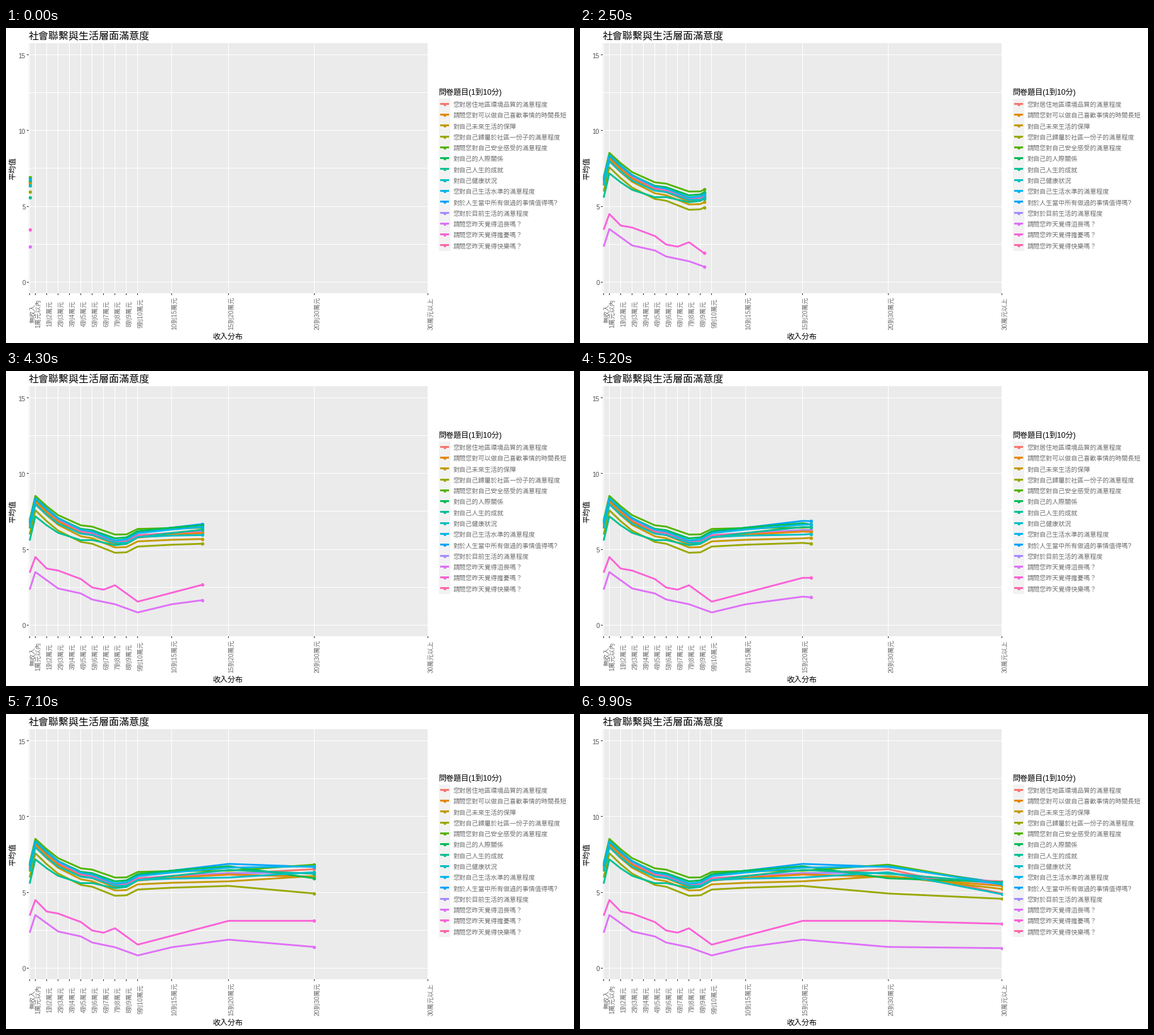
Write a matplotlib script that moves like this. It is 900 px wide and 500 px high and loops after 10000 ms.

```python
import numpy as np
import matplotlib.pyplot as plt
from matplotlib.animation import FuncAnimation
from matplotlib.patches import Rectangle

W, H, DPI = 900, 500, 100
PX = 72 / DPI
FRAMES = 100
LEFT, RIGHT, TOP, BOTTOM = 36, 669, 24, 421
GREY, PALE = "#4D4D4D", "#6E6E6E"
plt.rcParams["font.family"] = ["Liberation Sans", "Noto Sans CJK JP"]

# income midpoints (10k) and their axis labels
income = np.array([0, *np.arange(0.5, 10), 12.5, 17.5, 25, 35])
bands = (["無收入", "1萬元以內"] + [f"{i}到{i + 1}萬元" for i in range(1, 10)]
         + ["10到15萬元", "15到20萬元", "20到30萬元", "30萬元以上"])
# each point is reached on a whole frame, with even motion in between
reach = np.floor(income / 35 * (FRAMES - 1) + 0.5)


def to_x(v):
    return 37.3 + np.asarray(v) * 631 / 35


def to_y(v):
    return 403.7 - np.asarray(v) * 24.1


def hue(i, n):
    """Evenly spaced hue i of n at luminance 65 and chroma 100 (CIE LUV)."""
    h = np.radians(15 + 360 * i / n)
    lum = 65
    u = 100 * np.cos(h) / (13 * lum) + 0.1978
    v = 100 * np.sin(h) / (13 * lum) + 0.4683
    y = ((lum + 16) / 116) ** 3
    xyz = [9 * y * u / (4 * v), y, y * (12 - 3 * u - 20 * v) / (4 * v)]
    rgb = np.array([[3.2406, -1.5372, -0.4986],
                    [-0.9689, 1.8758, 0.0415],
                    [0.0557, -0.2040, 1.0570]]) @ xyz
    rgb = np.clip(rgb, 0, 1)
    return np.where(rgb > 0.0031308, 1.055 * rgb ** (1 / 2.4) - 0.055,
                    12.92 * rgb)


def curve(points):
    """Values at every income, linear between a few key points."""
    return np.interp(income, list(points), list(points.values()))


fig = plt.figure(figsize=(W / DPI, H / DPI), dpi=DPI, facecolor="white")
ax = fig.add_axes([0, 0, 1, 1])
ax.set(xlim=(0, W), ylim=(H, 0))
ax.axis("off")


def box(x, y, w, h, color, z=0):
    patch = Rectangle((x, y), w, h, fc=color, lw=0, zorder=z)
    ax.add_patch(patch)
    return patch


def label(x, y, s, size, color="black", ha="left", rot=0):
    ax.text(x, y, s, size=size * PX, color=color, ha=ha,
            va="center" if rot else "center_baseline", rotation=rot)


def draw_axes():
    for v in np.arange(0, 15.1, 2.5):
        y = np.floor(to_y(v))
        box(LEFT, y, RIGHT - LEFT, 1, "white", 1)
        if v % 5 == 0:
            box(LEFT - 3, y, 3, 1, "#333333", 1)
            label(31, y + 1.5, f"{v:.0f}", 10, GREY, "right")
    for v, band in zip(income, bands):
        x = np.floor(to_x(v))
        box(x, TOP, 1, BOTTOM - TOP, "white", 1)
        box(x, BOTTOM, 1, 3, "#333333", 1)
        label(x + 5.5, 453, band, 10, PALE, "center", 90)
    label(36, 12.5, "社會聯繫與生活層面滿意度", 16)
    label(351.5, 489, "收入分布", 12, ha="center")
    label(11, 223, "平均值", 12, ha="center", rot=90)
    label(686, 101, "問卷題目(1到10分)", 12)


panel = box(LEFT, TOP, RIGHT - LEFT, BOTTOM - TOP, "#EBEBEB")
draw_axes()

# shared course of the satisfaction answers
common = curve({0: 6.5, 0.5: 8.1, 1.5: 7.4, 2.5: 6.8, 4.5: 6.1, 5.5: 6.0,
                7.5: 5.45, 8.5: 5.5, 9.5: 5.9, 12.5: 6.08, 17.5: 6.3,
                25: 6.35, 35: 5.45})


def around(*shift):
    """The common course, shifted at five key incomes."""
    return common + curve(dict(zip((0.5, 7.5, 17.5, 25, 35), shift)))


answers = {
    "您對居住地區環境品質的滿意程度": around(0, 0, -.05, .2, -.5),
    "請問您對可以做自己喜歡事情的時間長短": around(.1, -.1, -.1, -.3, 0),
    "對自己未來生活的保障": around(-.1, -.3, -.55, -.25, -.2),
    "您對自己歸屬於社區一份子的滿意程度": around(-.5, -.65, -.85, -1.4, -.85),
    "請問您對自己安全感受的滿意程度": around(.45, .55, .15, .5, .1),
    "對自己的人際關係": around(.25, .3, .45, -.4, .25),
    "對自己人生的成就": around(-.9, -.15, .2, -.1, .2),
    "對自己健康狀況": around(-.1, 0, -.3, 0, -.55),
    "您對自己生活水準的滿意程度": around(.3, .15, .35, .4, .1),
    "對於人生當中所有做過的事情值得嗎?": around(.35, .15, .6, .35, .2),
    "您對於目前生活的滿意程度": around(.1, .05, 0, -.05, .1),
    "請問您昨天覺得沮喪嗎？": curve({
        0: 2.37, 0.5: 3.53, 2.5: 2.45, 4.5: 2.12, 5.5: 1.72, 7.5: 1.41,
        9.5: 0.87, 12.5: 1.41, 17.5: 1.91, 25: 1.43, 35: 1.35}),
    "請問您昨天覺得擔憂嗎？": curve({
        0: 3.49, 0.5: 4.52, 1.5: 3.76, 2.5: 3.63, 4.5: 3.07, 5.5: 2.51,
        6.5: 2.37, 7.5: 2.66, 9.5: 1.58, 17.5: 3.15, 25: 3.15, 35: 2.95}),
    "請問您昨天覺得快樂嗎？": around(.15, .1, -.1, -.3, .3),
}

# series stack in the text order of their numbers: 1, 10, 11, ... 2, 3
count = len(answers)
stack = sorted(range(count), key=lambda i: str(i + 1))


def add_series(i, name, values):
    color = hue(i, count)
    y = 120.3 + 17.28 * i
    box(686.3, y - 8.64, 17.28, 17.28, "#F2F2F2")
    box(688, round(y - 1.5), 14, 3, color, 2)
    ax.plot(695, round(y - 1.5) + 1.5, "o", color=color, ms=5 * PX, mew=0,
            zorder=3)
    label(709, y + 0.7, name, 10, PALE)
    z = stack.index(i) / count
    line, = ax.plot([], [], color=color, lw=2.8 * PX, zorder=4 + z,
                    solid_capstyle="butt", solid_joinstyle="round")
    dot, = ax.plot([], [], "o", color=color, ms=5.4 * PX, mew=0, zorder=5 + z)
    for art in (line, dot):
        art.set_clip_path(panel)
    return line, dot, to_y(values) + 0.5


series = [add_series(i, *item) for i, item in enumerate(answers.items())]
xs = to_x(income) + 0.2


def update(n):
    done = reach < n
    x = np.interp(n, reach, xs)
    artists = []
    for line, dot, ys in series:
        y = np.interp(n, reach, ys)
        line.set_data([*xs[done], x], [*ys[done], y])
        dot.set_data([x], [y])
        artists += [line, dot]
    return artists


anim = FuncAnimation(fig, update, frames=FRAMES, interval=100, repeat=True,
                     repeat_delay=0, blit=False)
plt.show()
```
